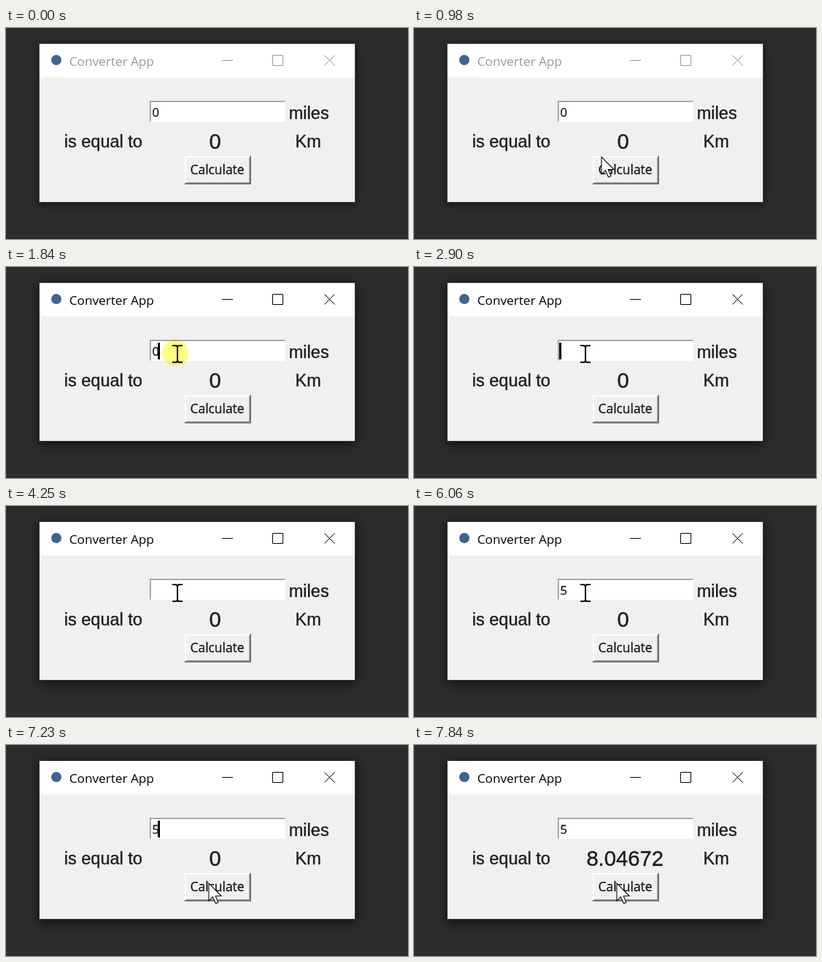
Animation, 551 px wide and 290 px high, one loop 8 s. Source, as an HTML page:

```html
<!DOCTYPE html>
<html lang="en">
<head>
<meta charset="utf-8">
<title>Converter App</title>
<style>
html, body { margin: 0; width: 100%; height: 100%; overflow: hidden; background: #2b2b2b; }
svg { display: block; }
text { white-space: pre; }
.ui { font-family: "Open Sans", "Noto Sans", sans-serif; }
.label { font: 23.5px "Liberation Sans", Arial, sans-serif; }
.label, .dark { fill: #1c1c1c; stroke: #1c1c1c; stroke-width: .35; }
#result { font-size: 29.2px; }
#frame { stroke: #505050; filter: drop-shadow(0 2px 5px #0009); }
#frame.active { stroke: #383838; filter: drop-shadow(0 3px 7px #000a); }
#halo { fill: #ffff80; mix-blend-mode: multiply; }
</style>
</head>
<body>
<svg width="551" height="290" viewBox="0 0 551 290">
  <rect width="551" height="290" fill="#2b2b2b"/>
  <path d="M.5 0V290M0 285.5H551" stroke="#3a3838"/>
  <rect id="frame" x="45.5" y="21.5" width="433" height="218" fill="#f0f0f0"/>
  <rect x="46" y="22" width="432" height="46" fill="#fff"/>
  <circle cx="69" cy="44" r="7" fill="#3a6594"/>
  <g id="bar">
    <text class="ui" x="86.7" y="52" font-size="17.2">Converter App</text>
    <path d="M296 44.5H311M365.5 37.5H379.5V51.5H365.5ZM436.5 37.5L450.5 51.5M450.5 37.5L436.5 51.5" fill="none" stroke="currentColor"/>
  </g>

  <rect x="197" y="100" width="186" height="29" fill="#fff"/>
  <path d="M197 100.5H383M197.5 100V129" stroke="#a0a0a0"/>
  <path d="M198 101.5H382M198.5 101V128" stroke="#b4b4b4"/>
  <text id="entry" class="ui dark" x="200.3" y="122" font-size="17"></text>
  <rect id="caret" y="104" width="3" height="23"/>

  <text class="label" x="387.8" y="125">miles</text>
  <text class="label" x="79.8" y="164">is equal to</text>
  <text class="label" x="396.5" y="164">Km</text>
  <text id="result" class="label" y="166"></text>

  <rect x="245" y="176" width="91" height="39" fill="#f0f0f0"/>
  <path id="light" d="M245 177H335M246 176V214" stroke-width="2"/>
  <path id="mid" d="M247 212.5H334M333.5 178V213" stroke="#a0a0a0"/>
  <path id="dark" d="M245 214H336M335 176V215" stroke-width="2"/>
  <text id="calc" class="ui dark" x="252.5" y="201" font-size="17.4">Calculate</text>

  <path id="arrow" d="M0 0V24L5.5 18.8L9.5 28L13 26.5L9.2 17.5H17Z" fill="#fff" stroke="#111" stroke-width="1.1"/>
  <path id="beam" d="M-7 -11.5H-3Q0 -11.5 0 -9V9Q0 11.5 -3 11.5H-7M7 -11.5H3Q0 -11.5 0 -9V9Q0 11.5 3 11.5H7" fill="none" stroke="#000" stroke-width="2"/>
  <circle id="halo" r="18"/>
</svg>
<script>
const LOOP = 8000;
const $ = id => document.getElementById(id);
const set = (id, attrs) => Object.entries(attrs).forEach(([k, v]) => $(id).setAttribute(k, v));
const show = (id, on) => set(id, { visibility: on ? "visible" : "hidden" });
const within = (t, [a, b]) => t >= a && t < b;

// Pointer moves, each sampled in a number of discrete steps
const moves = [
  { from: 570, to: 700, steps: 4, path: [[265, 274], [254, 228], [248, 188], [261, 176]] },
  { from: 980, to: 1210, steps: 6, path: [[257, 177], [250, 150], [244, 126], [247, 112], [253, 107]] },
  { from: 1360, to: 1660, steps: 7, path: [[252, 107], [245, 112], [238, 117], [235, 119.5]] },
  { from: 6340, to: 7000, steps: 13, path: [[236, 121], [255, 152], [278, 178], [277, 185], [278, 190]] }
];
const caretOn = [[1840, 2420], [2750, 3360], [3640, 4250], [4560, 5140], [5470, 6060], [6340, 6940], [7230, 7840]];
const clicks = [[1840, 2060], [7280, 7460]];

function pointer(t) {
  const m = moves.findLast(m => t >= m.from);
  if (!m) return null;
  const n = m.steps - 1;
  const step = Math.min(n, Math.floor((t - m.from) / (m.to - m.from) * n + 1e-6));
  const u = step / n * (m.path.length - 1);
  const i = Math.min(Math.floor(u), m.path.length - 2);
  return m.path[i].map((v, k) => v + (m.path[i + 1][k] - v) * (u - i));
}

function draw(t) {
  const active = t >= clicks[0][0];
  const ink = active ? "#000" : "#999";
  set("bar", { fill: ink, color: ink });
  set("frame", { class: active ? "active" : "" });

  const value = t < 2900 ? "0" : t < 5600 ? "" : "5";
  $("entry").textContent = value;
  set("caret", { x: value ? 208 : 199 });
  show("caret", caretOn.some(span => within(t, span)));

  const done = t >= clicks[1][1];
  $("result").textContent = done ? "8.04672" : "0";
  set("result", { x: done ? 236.4 : 278.6 });

  const pressed = within(t, clicks[1]);
  set("light", { stroke: pressed ? "#696969" : "#fff" });
  set("dark", { stroke: pressed ? "#fff" : "#747474" });
  show("mid", !pressed);
  set("calc", { transform: pressed ? "translate(1 1)" : "" });

  const p = pointer(t);
  const inEntry = p && p[1] > 100 && p[1] < 130;
  show("arrow", p && !inEntry);
  show("beam", inEntry);
  show("halo", clicks.some(span => within(t, span)));
  if (p) {
    const [x, y] = p;
    set("arrow", { transform: `translate(${x} ${y})` });
    set("beam", { transform: `translate(${x} ${y})` });
    set("halo", { cx: x - 3, cy: y - 1.5 });
  }
}

const start = performance.now();
function tick() {
  draw((performance.now() - start) % LOOP);
  requestAnimationFrame(tick);
}
tick();
</script>
</body>
</html>
```
